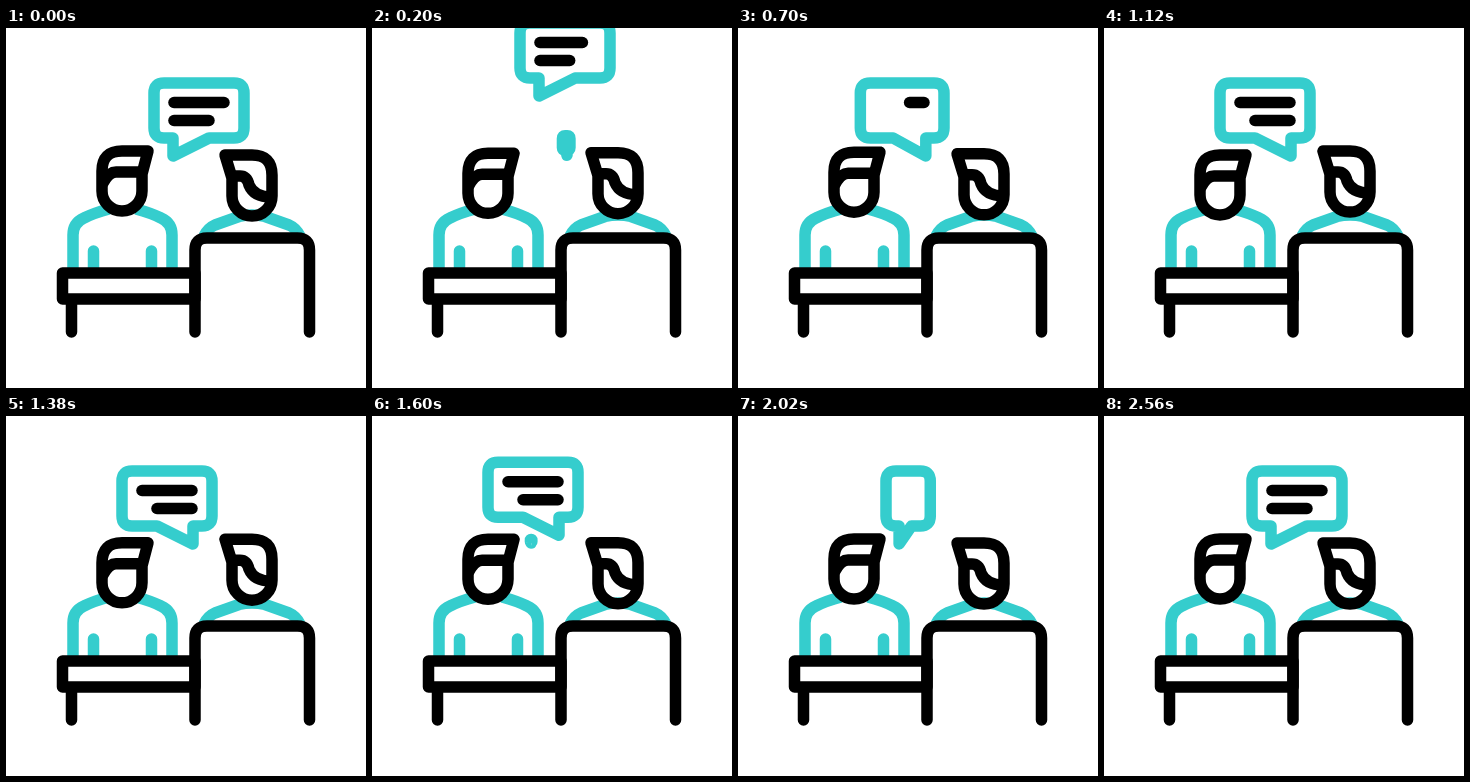
Animation of 360 by 360 pixels, one loop 3 s. Source, as an HTML page with a canvas:

```html
<!DOCTYPE html>
<html lang="en">
<head>
<meta charset="utf-8">
<style>
  html, body { margin: 0; height: 100%; overflow: hidden; background: #fff; }
  canvas { display: block; width: 100vmin; height: 100vmin; }
</style>
</head>
<body>
<canvas width="360" height="360"></canvas>
<script>
const ctx = document.querySelector('canvas').getContext('2d');
const TEAL = '#35cdcd', BLACK = '#000';
const LOOP = 3000, BOB = 833, WEIGHT = 11.5;

const mix = (a, b, p) => a + (b - a) * p;
const ramp = (t, from, to) => Math.min(1, Math.max(0, (t - from) / (to - from)));
const ease = (t, from, to) => (1 - Math.cos(Math.PI * ramp(t, from, to))) / 2;

function stroke(path, color, cap = 'round') {
  ctx.strokeStyle = color;
  ctx.lineCap = cap;
  ctx.stroke(new Path2D(path));
}

function shifted(dy, draw) {
  ctx.save();
  ctx.translate(0, dy);
  draw();
  ctx.restore();
}

function bubblePath(open, widen) {
  const left = mix(159, 148, open), right = mix(159, 176, open) + 62 * widen;
  const top = mix(127, 55, open), bottom = mix(127, 110, open);
  const r = 10 * open;
  const tip = 159 + 8 * widen, tailEnd = mix(159, 163, open) + 40 * widen;
  return `M${left + r} ${bottom}H${tip}V${127 + open}L${tailEnd} ${bottom}H${right - r}
    Q${right} ${bottom} ${right} ${bottom - r}V${top + r}Q${right} ${top} ${right - r} ${top}
    H${left + r}Q${left} ${top} ${left} ${top + r}V${bottom - r}Q${left} ${bottom} ${left + r} ${bottom}Z`;
}

// age: time since the bubble started growing; exit: time since it started rising away
function bubble(age, exit, mirrored) {
  const scale = 1 - ease(exit, 200, 430);
  if (age < 0 || scale <= 0) return;
  ctx.save();
  if (mirrored) ctx.transform(-1, 0, 0, 1, 354, 0);
  ctx.translate(165, 133 - 119 * ease(exit, 0, 400));
  ctx.scale(scale, scale);
  ctx.translate(-165, -133);
  ctx.lineWidth = WEIGHT / scale ** (2 / 3); // the outline thins more slowly than the bubble shrinks
  stroke(bubblePath(ramp(age, 0, 322), ease(age, 322, 655)), TEAL);
  ctx.lineWidth = WEIGHT;
  const kept = 1 - ease(exit, 150, 350);
  const first = ease(age, 485, 765) * kept, second = ease(age, 705, 975) * kept;
  if (first) stroke(`M168 74.5h${50 * first}`, BLACK);
  if (second) stroke(`M168 92.5h${35 * second}`, BLACK);
  ctx.restore();
}

function bodies() {
  stroke('M67 240V207Q67 195 78 190Q88 185 103 181', TEAL, 'butt');
  stroke('M166 240V207Q166 195 155 190Q145 185 130 181', TEAL, 'butt');
  stroke('M87.5 240V223M145.5 240V223', TEAL);
  stroke('M198 208Q202 200 209 197L233 188.5Q246 185.5 259 188.5L283 197Q290 200 294 208', TEAL, 'butt');
}

function leftHead() {
  stroke('M142 123H116Q96 123 96 143V163A20 20 0 0 0 136 163V146Z', BLACK);
  stroke('M97 155Q103 144 110 144H136', BLACK);
}

function rightHead() {
  stroke('M219 122H246Q266 122 266 142V163A20 20 0 0 1 226 163V145Z', BLACK);
  stroke('M226 143H234Q241 143 243 152Q248 164 265 164', BLACK);
}

function furniture() {
  stroke('M56.5 245H189V271H56.5ZM65.5 271V304', BLACK);
  stroke('M189 304V222Q189 210 201 210H291.5Q303.5 210 303.5 222V304', BLACK);
}

function draw(t) {
  ctx.fillStyle = '#fff';
  ctx.fillRect(0, 0, 360, 360);
  ctx.lineWidth = WEIGHT;
  ctx.lineJoin = 'round';

  const nod = t < 2 * BOB ? 2.5 * (1 - Math.cos(2 * Math.PI * t / BOB)) : 0;
  bodies();
  shifted(nod, leftHead);
  shifted(5 - nod, rightHead);
  furniture();

  // the left bubble grows late in the loop and leaves at the start of the next
  const leaving = t < 1585 ? t : t - LOOP;
  bubble(leaving + LOOP - 1585, leaving, false);
  bubble(t - 115, t - 1531, true);
}

function tick() {
  draw(performance.now() % LOOP);
  requestAnimationFrame(tick);
}
tick();
</script>
</body>
</html>
```
